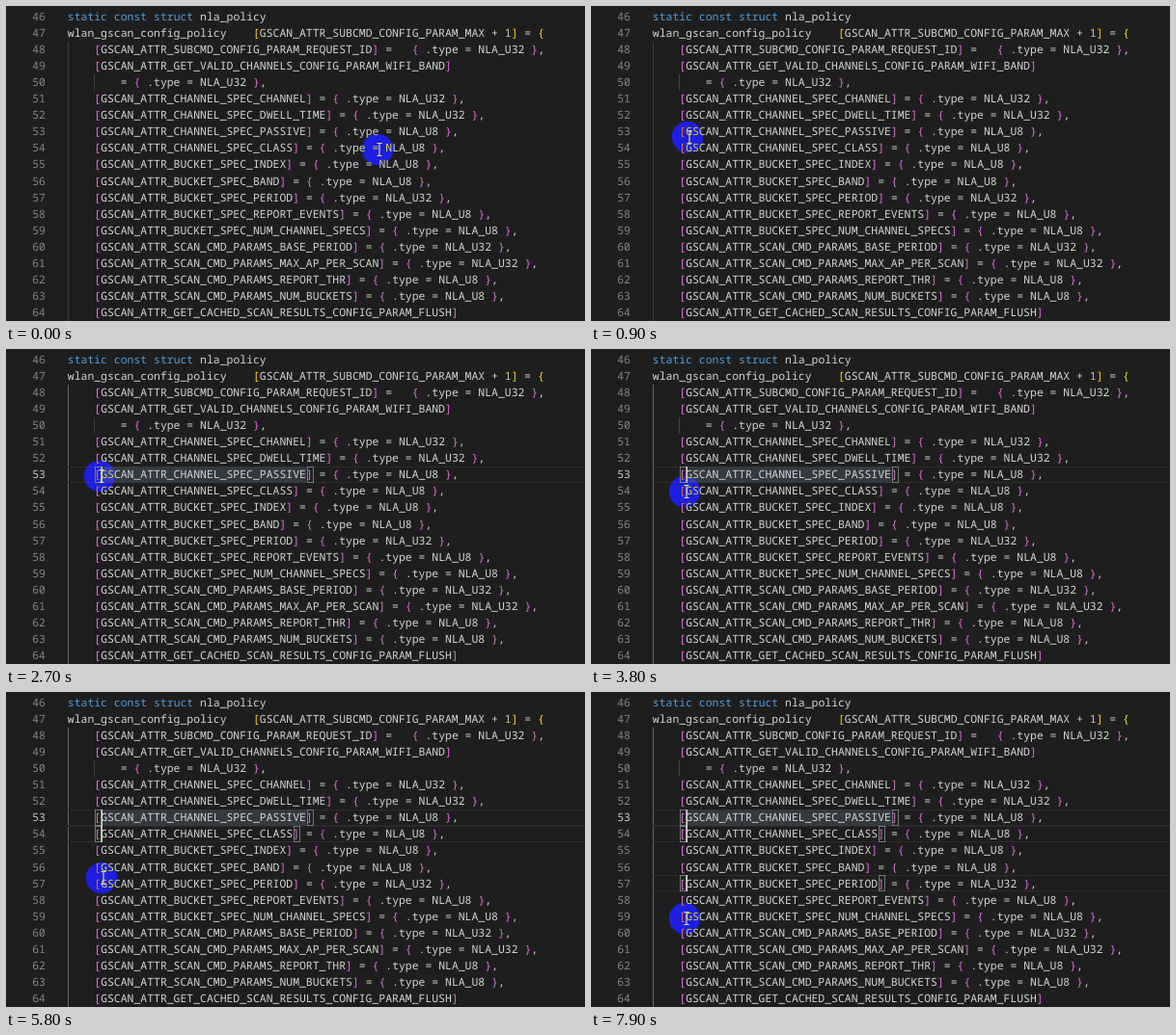
Recreate the animation shown at these times as an HTML page. Size 600 px wide and 327 px high, loop 8000 ms.

```html
<!DOCTYPE html>
<html lang="en">
<head>
<meta charset="utf-8">
<title>Multi-cursor editing</title>
<style>
html, body { margin: 0; width: 100%; height: 100%; overflow: hidden; background: #1e1e1e; }
svg { display: block; width: 600px; height: 327px; isolation: isolate; }
text {
  font: 11.458px "Noto Sans Mono", "DejaVu Sans Mono", monospace;
  white-space: pre;
  text-rendering: geometricPrecision;
  fill: #d4d4d4;
}
#spot { fill: #00f; mix-blend-mode: difference; }
</style>
</head>
<body>
<svg id="stage" viewBox="0 0 600 327"></svg>
<script>
(() => {
const LOOP = 8000, STEP = 100, BLINK = 475, MARK_DELAY = 300;
const LEFT = 64, CHAR = 6.875, ROW = 17.03, FIRST = 46;
const stage = document.getElementById("stage");

const field = (name, type) => `    [GSCAN_ATTR_${name}] = { .type = NLA_${type} },`;
const lines = [
  "static const struct nla_policy",
  "wlan_gscan_config_policy    [GSCAN_ATTR_SUBCMD_CONFIG_PARAM_MAX + 1] = {",
  "    [GSCAN_ATTR_SUBCMD_CONFIG_PARAM_REQUEST_ID] =   { .type = NLA_U32 },",
  "    [GSCAN_ATTR_GET_VALID_CHANNELS_CONFIG_PARAM_WIFI_BAND]",
  "        = { .type = NLA_U32 },",
  field("CHANNEL_SPEC_CHANNEL", "U32"),
  field("CHANNEL_SPEC_DWELL_TIME", "U32"),
  field("CHANNEL_SPEC_PASSIVE", "U8"),
  field("CHANNEL_SPEC_CLASS", "U8"),
  field("BUCKET_SPEC_INDEX", "U8"),
  field("BUCKET_SPEC_BAND", "U8"),
  field("BUCKET_SPEC_PERIOD", "U32"),
  field("BUCKET_SPEC_REPORT_EVENTS", "U8"),
  field("BUCKET_SPEC_NUM_CHANNEL_SPECS", "U8"),
  field("SCAN_CMD_PARAMS_BASE_PERIOD", "U32"),
  field("SCAN_CMD_PARAMS_MAX_AP_PER_SCAN", "U32"),
  field("SCAN_CMD_PARAMS_REPORT_THR", "U8"),
  field("SCAN_CMD_PARAMS_NUM_BUCKETS", "U8"),
  "    [GSCAN_ATTR_GET_CACHED_SCAN_RESULTS_CONFIG_PARAM_FLUSH]"
];

// Pointer moves: from, until, target x, y; it rests in between
const home = [385, 149];
const moves = [
  [0, 100, 393, 152], [100, 900, 100, 136], [2500, 2700, 97, 132],
  [3000, 3300, 97, 126], [3300, 3800, 97, 148], [4000, 4600, 97, 155],
  [4700, 5600, 98, 203], [5700, 5800, 99, 193], [6000, 6300, 99, 204],
  [7000, 7900, 97, 235]
];
const clicks = [{ n: 53, at: 1700 }, { n: 54, at: 3900 }, { n: 57, at: 6700 }];

function add(tag, attrs, parent = stage) {
  const el = document.createElementNS("http://www.w3.org/2000/svg", tag);
  for (const key in attrs) el.setAttribute(key, attrs[key]);
  return parent.appendChild(el);
}
const rect = (x, y, width, height, fill, parent) =>
  add("rect", { x, y, width, height, fill }, parent);
const middle = n => 11.2 + (n - FIRST) * ROW;
const rowTop = n => Math.round(middle(n) - ROW / 2);
const colX = col => LEFT + col * CHAR;
const show = (el, on) => el.setAttribute("visibility", on ? "visible" : "hidden");

rect(0, 0, 600, 327, "#1e1e1e");
const guide = rect(LEFT, 37, 1, 290, "#404040");
rect(91, rowTop(50), 1, 17, "#404040");

for (const row of clicks) {
  const y = rowTop(row.n), close = lines[row.n - FIRST].indexOf("]");
  row.g = add("g");
  rect(LEFT, y, 536, 1, "#2b2b2b", row.g);
  rect(LEFT, y + 16, 536, 1, "#2b2b2b", row.g);
  for (const col of [4, close])
    add("rect", { x: Math.round(colX(col)) + .5, y: y + .5, width: 6, height: 16,
      fill: "#1b251b", stroke: "#777" }, row.g);
}
const mark = rect(colX(5), rowTop(53), 31 * CHAR, 17, "#333a40");

function color(token, n) {
  if (/^[[\]{}]$/.test(token)) return n === 47 ? "#ffd700" : "#da70d6";
  if (/^(static|const|struct)$/.test(token)) return "#569cd6";
  return token === "1" ? "#b5cea8" : "#d4d4d4";
}
const numbers = {};
lines.forEach((line, i) => {
  const n = FIRST + i, y = middle(n) + 4;
  numbers[n] = add("text", { x: 27.2, y });
  numbers[n].textContent = n;
  numbers[n].style.fill = "#858585";
  const text = add("text", { x: LEFT - .2, y });
  for (const token of line.match(/[[\]{}]|\w+|[^[\]{}\w]+/g)) {
    const span = add("tspan", {}, text);
    span.textContent = token;
    span.style.fill = color(token, n);
  }
});

for (const row of clicks) row.caret = rect(98.5, rowTop(row.n), 1.5, 17, "#d8d8d8");
const spot = add("circle", { id: "spot", r: 16.2 });
const beam = add("path", {
  d: "M-2.5-6.5H-.8L0-5.7.8-6.5H2.5M0-5.7V5.7M-2.5 6.5H-.8L0 5.7.8 6.5H2.5",
  fill: "none", stroke: "#e6e6b0", "stroke-width": 1.1
});

function pointer(t) {
  let [x, y] = home;
  for (const [from, until, toX, toY] of moves) {
    const k = Math.min(1, Math.max(0, (t - from) / (until - from)));
    const ease = k * k * (3 - 2 * k);
    x += (toX - x) * ease;
    y += (toY - y) * ease;
  }
  return [x, y];
}

function draw(t) {
  const [x, y] = pointer(t);
  spot.setAttribute("cx", x);
  spot.setAttribute("cy", y);
  beam.setAttribute("transform", `translate(${x + 2} ${y})`);

  // Every click restarts the blinking of all carets
  const made = clicks.filter(row => t >= row.at);
  const active = made.length > 0;
  const lit = active && Math.floor((t - made[made.length - 1].at) / BLINK) % 2 === 0;
  for (const row of clicks) {
    show(row.g, t >= row.at);
    show(row.caret, t >= row.at && lit);
  }
  show(mark, t >= clicks[0].at + MARK_DELAY);
  numbers[53].style.fill = active ? "#c6c6c6" : "#858585";
  guide.setAttribute("fill", active ? "#666" : "#404040");
}

const start = performance.now();
function tick() {
  const t = (performance.now() - start) % LOOP;
  draw(Math.floor(t / STEP) * STEP);
  requestAnimationFrame(tick);
}
tick();
})();
</script>
</body>
</html>
```
